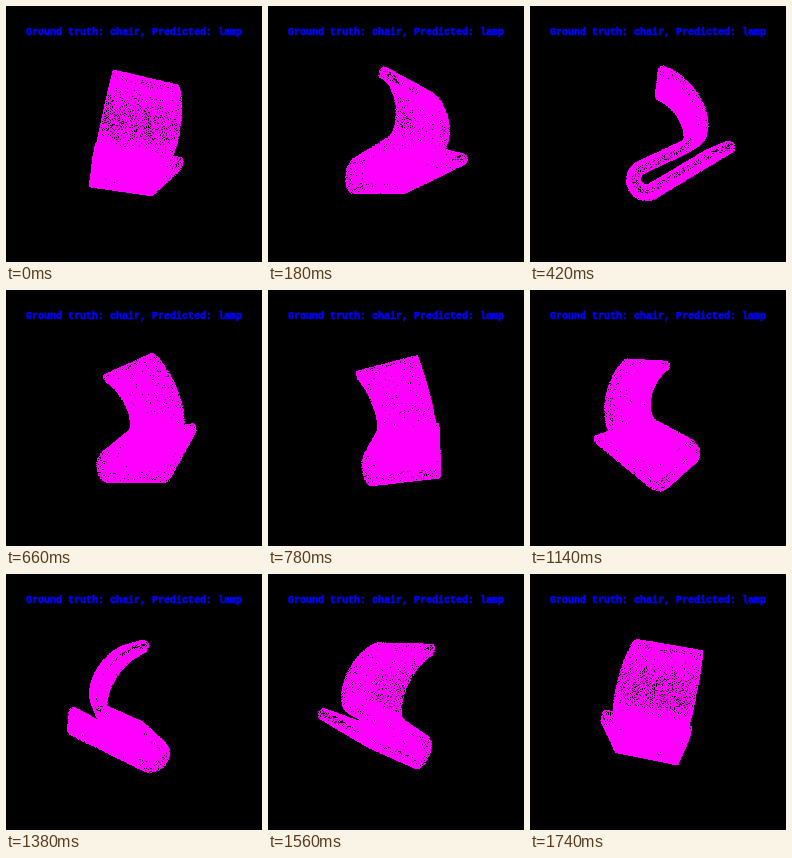
An HTML page with a canvas that plays this animation: 256x256 px, repeating every 1800 ms.

```html
<!DOCTYPE html>
<html lang="en">
<head>
<meta charset="utf-8">
<title>Chair point cloud</title>
<style>
html, body { margin: 0; width: 100%; height: 100%; overflow: hidden; background: #000; }
canvas, svg { position: absolute; left: 0; top: 0; width: 256px; height: 256px; }
text {
  font: bold 10px "Liberation Mono", "Courier New", monospace;
  fill: #00f; stroke: #00f; stroke-width: 0.5px; white-space: pre;
}
</style>
</head>
<body>
<canvas id="stage" width="256" height="256"></canvas>
<svg viewBox="0 0 256 256"><text x="20" y="29">Ground truth: chair, Predicted: lamp</text></svg>
<script>
const ctx = document.getElementById('stage').getContext('2d');
const STEP = 60, STEPS = 30, COUNT = 28000, FOCAL = 222, HALF = 5;

// Tilted frame of the chair: origin, backward, upward and full width
const origin = [-14, -60.7, -8.7];
const back = [0.214, 0.531, 0.819];
const up = [0.105, 0.829, -0.555];
const wide = [63.5, -12, -10.2];

let seed = 7;
function random() {
  seed = (seed * 1664525 + 1013904223) % 4294967296;
  return seed / 4294967296;
}

// Side profile: floor, hairpin, seat, curved backrest
const profile = document.createElementNS('http://www.w3.org/2000/svg', 'path');
profile.setAttribute('d', 'M87 0L9 4A11.5 11.5 0 0 0 9 27L58 20C79 17 93 62 70 92');
const total = profile.getTotalLength();
const line = Array.from({ length: 601 }, (_, i) => profile.getPointAtLength(total * i / 600));

// Evenly spread samples on both faces, plus random ones on the narrow sides
function makePoint(_, n) {
  const s = n * 0.7548776662 % 1 * 600, i = Math.floor(s), f = s - i;
  const p = line[i], q = line[i + 1];
  const dx = q.x - p.x, dy = q.y - p.y, len = Math.hypot(dx, dy);
  const end = Math.min(s, 600 - s) * total / 600;
  const thick = end < HALF ? Math.sqrt(end * (2 * HALF - end)) : HALF;

  let across = n * 0.5698402910 % 1 - 0.5, off = n % 2 * 2 - 1;
  if (random() < 0.13) {
    across = Math.sign(across) / 2;
    off = random() * 2 - 1;
  }

  const a = p.x + dx * f - dy / len * off * thick;
  const b = p.y + dy * f + dx / len * off * thick;
  return origin.map((o, k) => o + a * back[k] + b * up[k] + across * wide[k]);
}

const points = Array.from({ length: COUNT }, makePoint);

function draw(step) {
  const angle = step / STEPS * 2 * Math.PI;
  const c = Math.cos(angle), s = Math.sin(angle);
  ctx.fillStyle = '#000';
  ctx.fillRect(0, 0, 256, 256);
  ctx.fillStyle = '#f0f';
  for (const [x, y, z] of points) {
    const scale = FOCAL / (FOCAL + x * s - z * c);
    const px = 128 + (x * c + z * s) * scale, py = 128 - y * scale;
    ctx.fillRect(Math.floor(px), Math.floor(py), 1, 1);
  }
}

let shown = -1;
function tick() {
  const step = Math.floor(performance.now() / STEP) % STEPS;
  if (step !== shown) draw(shown = step);
  requestAnimationFrame(tick);
}
tick();
</script>
</body>
</html>
```
